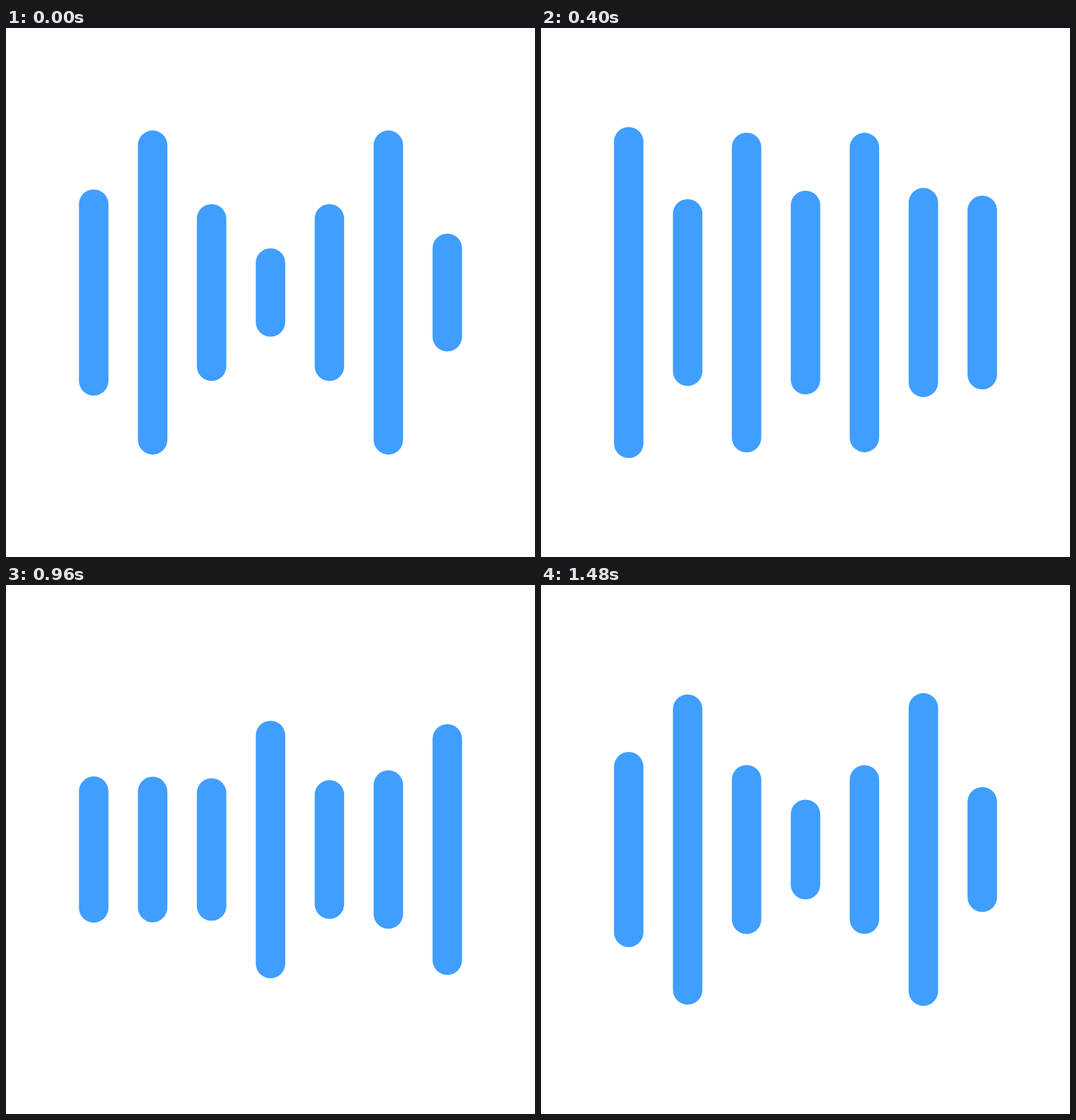
Write an HTML page that moves like this. It is 748 px wide and 748 px high and loops after 1520 ms.

```html
<!DOCTYPE html>
<html lang="en">
<head>
<meta charset="utf-8">
<title>Sound wave</title>
<style>
  html, body { margin: 0; width: 100%; height: 100%; overflow: hidden; background: #fff; }
  svg { display: block; width: 100vw; height: 100vh; }
  line { stroke: #409eff; stroke-width: 41.67; stroke-linecap: round; }
</style>
</head>
<body>
<svg id="wave" viewBox="0 0 748 748"></svg>
<script>
  const LOOP = 1520, STEP = 40, MID = 374, GAP = 83.33, CAP = 20.83;
  const keyTimes = [0, 375, 750, 1143, LOOP];

  // Half height of each bar at the key times; the last key equals the first.
  const bars = [
    [145.8, 240.8, 139.4, 72],
    [229.2, 136.9, 64.7, 136.3],
    [125, 232.8, 132.5, 73.3],
    [62.5, 137.8, 231.5, 139],
    [125, 232.9, 128.7, 71.6],
    [229.2, 153.8, 64.9, 153.2],
    [83.3, 130.3, 231.6, 130]
  ];

  const svg = document.getElementById('wave');
  const lines = bars.map((_, i) => {
    const line = document.createElementNS('http://www.w3.org/2000/svg', 'line');
    const x = MID + (i - 3) * GAP;
    line.setAttribute('x1', x);
    line.setAttribute('x2', x);
    return svg.appendChild(line);
  });

  function halfHeight(keys, t) {
    const i = keyTimes.findIndex(k => k > t) - 1;
    const p = (t - keyTimes[i]) / (keyTimes[i + 1] - keyTimes[i]);
    return keys[i] + (keys[(i + 1) % 4] - keys[i]) * p;
  }

  function draw(t) {
    lines.forEach((line, i) => {
      const h = halfHeight(bars[i], t) - CAP;
      line.setAttribute('y1', MID - h);
      line.setAttribute('y2', MID + h);
    });
  }

  const start = performance.now();

  // The picture advances in 40 ms steps; the small lead absorbs timer jitter.
  function tick() {
    const t = performance.now() - start + 4;
    draw(Math.floor(t / STEP) * STEP % LOOP);
    requestAnimationFrame(tick);
  }
  tick();
</script>
</body>
</html>
```
